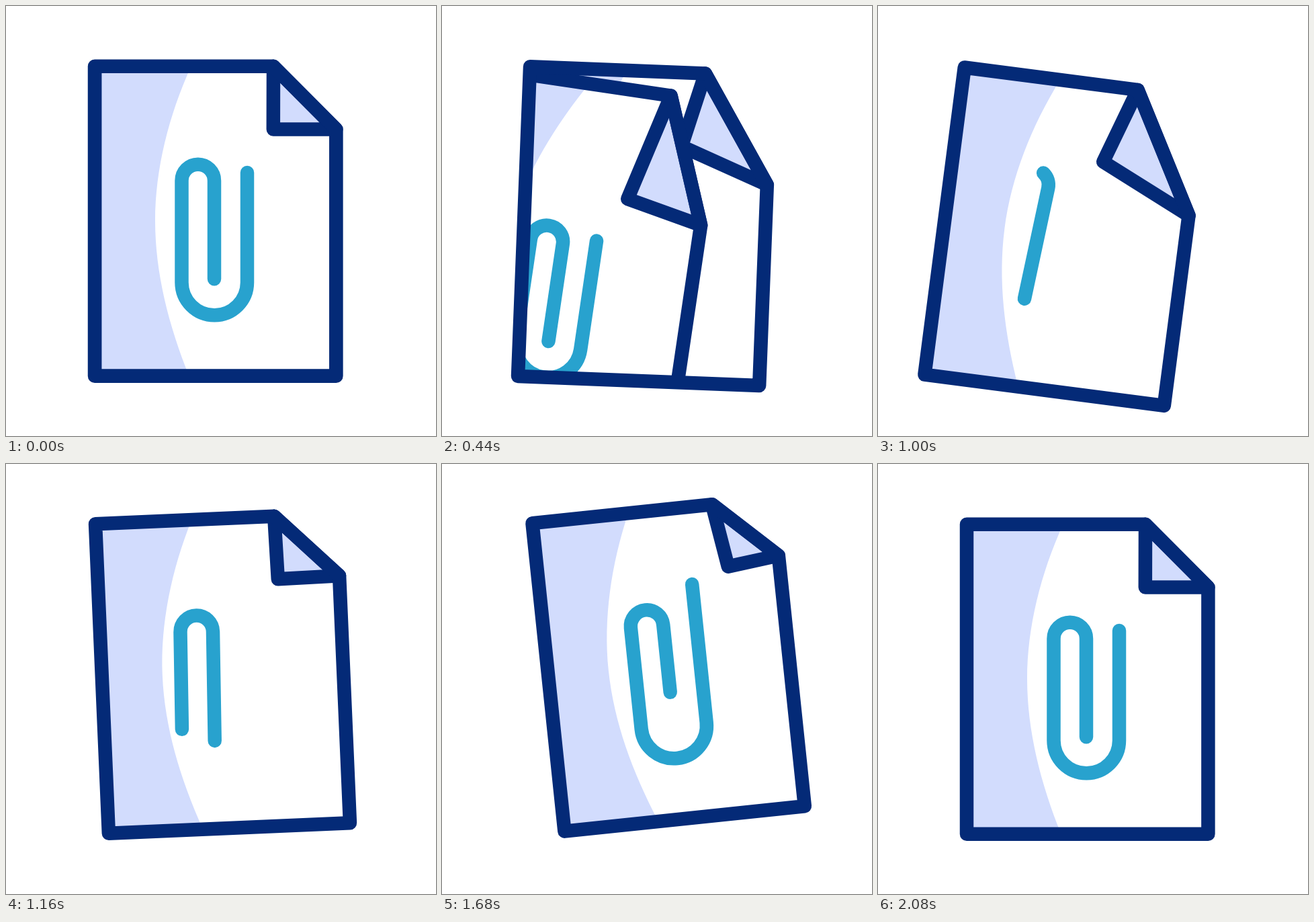
Recreate the animation shown at these times as an HTML page with a canvas. Size 640x640 px, loop 2200 ms.

```html
<!DOCTYPE html>
<html lang="en">
<head>
<meta charset="utf-8">
<title>Attached document</title>
<style>
  html, body { margin: 0; width: 100%; height: 100%; overflow: hidden; background: #fff; }
  canvas { display: block; width: 100%; height: 100%; }
</style>
</head>
<body>
<canvas id="stage" width="640" height="640"></canvas>
<script>
const ctx = document.getElementById('stage').getContext('2d');
const NAVY = '#042a77', PALE = '#d2dcfd', CYAN = '#28a2ce';
const LOOP = 2200, STEP = 40;
const W = 359.4, H = 461, LINE = 20.5;
const PIVOT = { x: 117.5, y: 65.5 }, CORNER = { x: 14.5, y: 24.3 };

// Smooth monotone curve through [time, value] keys
function track(keys) {
  const n = keys.length - 1;
  const slope = i => (keys[i + 1][1] - keys[i][1]) / (keys[i + 1][0] - keys[i][0]);
  const tan = keys.map((_, i) => {
    if (i === 0 || i === n) return 0;
    const a = slope(i - 1), b = slope(i);
    return a * b <= 0 ? 0 : 2 * a * b / (a + b);
  });
  return t => {
    if (t <= keys[0][0]) return keys[0][1];
    if (t >= keys[n][0]) return keys[n][1];
    let i = 0;
    while (t > keys[i + 1][0]) i++;
    const [t0, v0] = keys[i], [t1, v1] = keys[i + 1];
    const d = t1 - t0, u = (t - t0) / d, w = 1 - u;
    return v0 * (1 + 2 * u) * w * w + v1 * u * u * (3 - 2 * u)
      + d * u * w * (tan[i] * w - tan[i + 1] * u);
  };
}

const tilt = track([[120, 0], [240, .05], [360, .7], [440, 2.24], [520, 5.1], [600, 7.06],
  [640, 7.53], [800, 8], [920, 7.9], [1000, 7.4], [1060, 5.6], [1120, .8], [1200, -5.1],
  [1280, -7.7], [1360, -8.73], [1440, -9], [1520, -8.75], [1600, -7.9], [1680, -5.97],
  [1760, -2.7], [1840, -1], [1920, -.3], [2080, 0]]);
const bend = track([[1000, 1], [1080, .75], [1150, 0], [1240, -.7], [1360, -1],
  [1430, -1.03], [1680, -.72], [1760, -.33], [1920, -.04], [2080, 0]]);
const wireStart = track([[880, -25], [1000, -22], [1360, -5], [1620, 44], [1680, 45], [2080, 0]]);
const wireEnd = track([[880, -25], [1000, 171], [1360, 563], [1620, 734], [1680, 733], [2080, 690]]);
const wireLag = track([[900, 1.1], [1000, 1], [1200, .2], [1360, 0]]);

const clamp = x => Math.max(0, Math.min(1, x));
const inOut = (x, p) => {
  x = clamp(x);
  return x < .5 ? Math.pow(2 * x, p) / 2 : 1 - Math.pow(2 - 2 * x, p) / 2;
};

// Corner fold: top point, right point, inner point
const fold = (k, top, right, ix, iy) => ({
  top: 266 + top * k, right: 93.7 + right * k, ix: 265.8 + ix * k, iy: 93.7 + iy * k
});

function backFold(t) {
  const q = t < 1000 ? inOut((t - 80) / 580, 4) : bend(t);
  return q > 0 ? fold(q, -6, 81.8, -43, 19) : fold(-q, 4, -10.7, 24, 1);
}

function sheetPath(f) {
  ctx.beginPath();
  ctx.moveTo(0, 0);
  ctx.lineTo(f.top, 0);
  ctx.lineTo(W, f.right);
  ctx.lineTo(W, H);
  ctx.lineTo(0, H);
  ctx.closePath();
}

function pen(color) {
  ctx.strokeStyle = color;
  ctx.lineWidth = LINE;
  ctx.lineJoin = ctx.lineCap = 'round';
}

function outline(f) {
  pen(NAVY);
  sheetPath(f);
  ctx.stroke();
}

function paper(f, k) {
  ctx.save();
  sheetPath(f);
  ctx.fillStyle = '#fff';
  ctx.fill();
  ctx.clip();
  const top = 143.5 + 46 * k, lx = 90 - 40 * k, ly = 230 + 155 * k, end = 140.5;
  ctx.beginPath();
  ctx.moveTo(0, 0);
  ctx.lineTo(top, 0);
  ctx.bezierCurveTo(top - .62 * (top - lx), .317 * ly, lx, .665 * ly, lx, ly);
  ctx.bezierCurveTo(lx, ly + .333 * (H - ly), end - .61 * (end - lx), H - .333 * (H - ly), end, H);
  ctx.lineTo(0, H);
  ctx.fillStyle = PALE;
  ctx.fill();
  ctx.restore();
}

function flap(f) {
  ctx.beginPath();
  ctx.moveTo(f.top, 0);
  ctx.lineTo(f.ix, f.iy);
  ctx.lineTo(W, f.right);
  ctx.closePath();
  ctx.fillStyle = PALE;
  ctx.fill();
  pen(NAVY);
  ctx.stroke();
}

// The wire is a path longer than needed; a dash shows the part from..to
function wire(from, to) {
  const extra = 60;
  if (to - from < .5) return;
  ctx.save();
  pen(CYAN);
  ctx.setLineDash([to - from, 9999]);
  ctx.lineDashOffset = -(from + extra);
  ctx.beginPath();
  ctx.moveTo(178, 316.5 + extra);
  ctx.lineTo(178, 170.2);
  ctx.arc(153.75, 170.2, 24.25, 0, Math.PI, true);
  ctx.lineTo(129.5, 321.7);
  ctx.arc(178.25, 321.7, 48.75, Math.PI, 0, true);
  ctx.lineTo(227, 60);
  ctx.stroke();
  ctx.restore();
}

function place(deg, dx) {
  ctx.translate(PIVOT.x + dx, PIVOT.y);
  ctx.rotate(deg * Math.PI / 180);
  ctx.translate(CORNER.x, CORNER.y);
}

function frontSheet(t) {
  const u = Math.max(0, (t - 100) / 500);
  const k = Math.pow(u, 2.05);
  const f = fold(k, 46.6, 199.5, -44, 149);
  place(11.3 * inOut((t - 80) / 600, 3), -256 * Math.pow(u, 3.3));
  paper(f, k);
  ctx.save();
  ctx.translate(-39 * k, 158 * k);
  wire(0, 690);
  ctx.restore();
  flap(f);
  outline(f);
}

function newWire(t) {
  const lag = wireLag(t);
  ctx.save();
  ctx.translate(178 - 31.4 * lag, 170.2 - 8 * lag);
  ctx.rotate(4.7 * lag * Math.PI / 180);
  ctx.translate(-178, -170.2);
  wire(wireStart(t), wireEnd(t));
  ctx.restore();
}

function draw(t) {
  ctx.setTransform(1, 0, 0, 1, 0, 0);
  ctx.fillStyle = '#fff';
  ctx.fillRect(0, 0, 640, 640);
  const f = backFold(t), deg = tilt(t);

  ctx.save();
  place(deg, 0);
  paper(f, 0);
  flap(f);
  if (t >= 880) newWire(t);
  ctx.restore();

  if (t < 760) {
    ctx.save();
    place(deg, 0);
    sheetPath(f);
    ctx.clip();
    ctx.setTransform(1, 0, 0, 1, 0, 0);
    frontSheet(t);
    ctx.restore();
  }

  ctx.save();
  place(deg, 0);
  outline(f);
  ctx.restore();
}

const begin = performance.now();
function tick() {
  const t = (performance.now() - begin) % LOOP;
  draw(t < 120 ? 0 : Math.min(2080, Math.floor(t / STEP) * STEP));
  requestAnimationFrame(tick);
}
tick();
</script>
</body>
</html>
```
